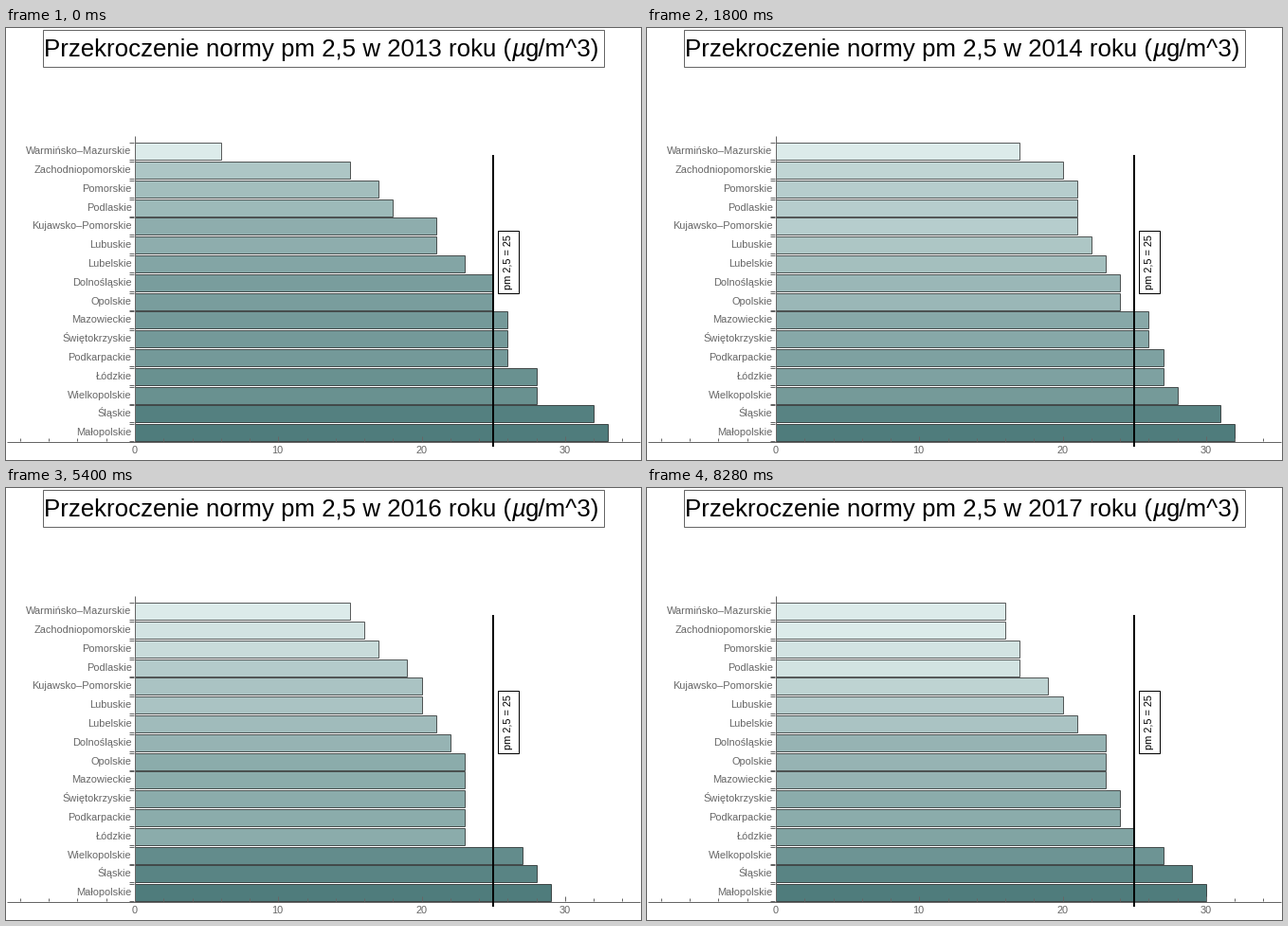
A matplotlib script that plays this animation: 670x456 px, repeating every 9000 ms.

```python
import numpy as np
import matplotlib.pyplot as plt
from matplotlib.animation import FuncAnimation
from matplotlib.patches import Rectangle

W, H, DPI = 670, 456, 64           # 64 keeps the inch sizes exact
PX = 72 / DPI                      # points per pixel
GREY = "#666666"
X0, UNIT = 135.5, 15.13            # zero of the value axis, pixels per unit
LIGHT = np.array([220, 235, 234]) / 255
DARK = np.array([79, 124, 124]) / 255

REGIONS = [
    "Warmińsko–Mazurskie", "Zachodniopomorskie", "Pomorskie", "Podlaskie",
    "Kujawsko–Pomorskie", "Lubuskie", "Lubelskie", "Dolnośląskie",
    "Opolskie", "Mazowieckie", "Świętokrzyskie", "Podkarpackie",
    "Łódzkie", "Wielkopolskie", "Śląskie", "Małopolskie",
]
LEVELS = {
    2013: [6, 15, 17, 18, 21, 21, 23, 25, 25, 26, 26, 26, 28, 28, 32, 33],
    2014: [17, 20, 21, 21, 21, 22, 23, 24, 24, 26, 26, 27, 27, 28, 31, 32],
    2015: [16, 16, 18, 19, 20, 21, 21, 23, 23, 25, 25, 25, 25, 27, 28, 32],
    2016: [15, 16, 17, 19, 20, 20, 21, 22, 23, 23, 23, 23, 23, 27, 28, 29],
    2017: [16, 16, 17, 17, 19, 20, 21, 23, 23, 23, 24, 24, 25, 27, 29, 30],
}
YEARS = list(LEVELS)
TOPS = [(1206 + 198 * i) // 10 + 0.5 for i in range(len(REGIONS))]
BAR_H = 18

plt.rcParams["font.family"] = "Liberation Sans"
fig = plt.figure(figsize=(W / DPI, H / DPI), dpi=DPI, facecolor="white")
ax = fig.add_axes([0, 0, 1, 1])
ax.set_xlim(0, W)
ax.set_ylim(H, 0)
ax.axis("off")


def px(value):
    """Pixel centre for a value on the horizontal axis."""
    return np.floor(X0 + UNIT * value) + 0.5


def line(x1, y1, x2, y2, color=GREY, width=1, z=3):
    ax.plot([x1, x2], [y1, y2], color=color, lw=width * PX, zorder=z,
            solid_capstyle="butt")


def box(x, y, w, h, edge, face="white", z=1):
    return ax.add_patch(Rectangle((x, y), w, h, facecolor=face, edgecolor=edge,
                                  lw=PX, zorder=z))


def label(x, y, s, size=11, color=GREY, **kw):
    return ax.text(x, y, s, fontsize=size * PX, color=color, va="baseline",
                   zorder=6, **kw)


def draw_axes():
    line(1, 436.5, 669, 436.5)
    line(X0, 114, X0, 437)
    for v in range(-8, 35, 2):
        line(px(v), 436, px(v), 431 if v % 10 == 0 else 433)
    for v in range(0, 31, 10):
        label(px(v), 449, str(v), ha="center")
    for top, name in zip(TOPS, REGIONS):
        line(130, top, 135, top)
        line(130, top + BAR_H, 135, top + BAR_H)
        label(132.5, top + 12.5, name, ha="right")


def draw_limit():
    line(514, 134, 514, 442, "black", 2, 4)
    box(518.5, 213.5, 22, 66, "black", z=5)
    label(533, 276, "pm 2,5 = 25", color="black", rotation=90,
          rotation_mode="anchor", ha="left")


def draw_title():
    size = 25.85
    box(38.5, 1.5, 592, 39, GREY)
    head = label(40, 30, "", size, "black")
    label(533, 30, "µ", size, "black", style="italic")
    label(547.5, 30, "g/m^3)", size, "black")
    return head


draw_axes()
draw_limit()
title = draw_title()
bars = [box(X0, top, 0, BAR_H, (0, 0, 0, 0.62), z=2) for top in TOPS]


def update(i):
    year = YEARS[i]
    levels = LEVELS[year]
    low, high = min(levels), max(levels)
    title.set_text(f"Przekroczenie normy pm 2,5 w {year} roku (")
    for bar, v in zip(bars, levels):
        t = (v - low) / (high - low)
        bar.set_width(px(v) - X0)
        bar.set_facecolor(LIGHT + (DARK - LIGHT) * t)
    return [title, *bars]


anim = FuncAnimation(fig, update, frames=len(YEARS), interval=1800, repeat=True)
plt.show()
```
